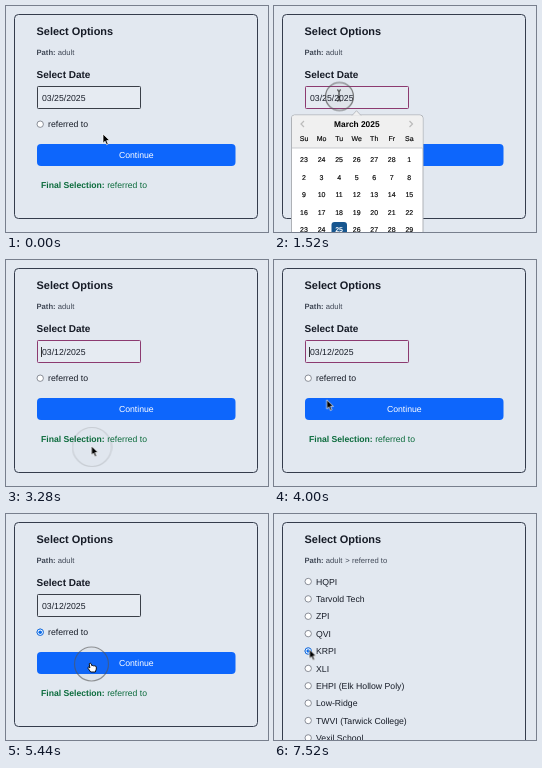
An HTML page for the animation above (8000 ms loop, 262 by 226 pixels).

```html
<!DOCTYPE html>
<html lang="en">
<head>
<meta charset="utf-8">
<title>Select options</title>
<style>
html, body { margin: 0; width: 100%; height: 100%; overflow: hidden; background: #e2e8f0; }
svg { display: block; width: 262px; height: 226px; }
text { font: 8.7px "Liberation Sans", Arial, sans-serif; fill: #161b26; text-rendering: geometricPrecision; white-space: pre; }
.b { font-weight: 700; }
.h1 { font-size: 10.95px; }
.h2 { font-size: 10px; }
.path { font-size: 7.65px; fill: #414957; }
.final { font-size: 8.65px; fill: #0b6b3c; }
.mid { text-anchor: middle; }
.month { font-size: 8.35px; fill: #000; }
.day { font-size: 7px; fill: #000; stroke: #000; stroke-width: .15; }
.white { fill: #fff; stroke: none; }
.frame { fill: none; stroke: #343c4c; }
.radio { fill: #fff; stroke: #707580; stroke-width: .8; }
.on { fill: #fff; stroke: #0b6be8; stroke-width: 1; }
.dot { fill: #0b6be8; }

/* One loop is 8 s, so 1% is 80 ms. */
.anim { animation: 8s step-end infinite; }
#first { animation-name: first; }
#second { animation-name: second; }
#input { animation-name: focus; }
#calendar { animation-name: calendar; }
#oldDate { animation-name: oldDate; }
#newDate { animation-name: newDate; }
#caret { animation-name: caret; }
#newCaret { animation-name: newCaret; }
#hover { animation-name: hover; }
#picked { animation-name: picked; }
#chosen { animation-name: chosen; }
#pointer { animation-name: move; animation-timing-function: ease-in-out; }
#ring { animation-name: ring; }
#arrow { animation-name: arrow; }
#beam { animation-name: beam; }
#hand { animation-name: hand; }

@keyframes first { 0% { opacity: 1 } 69%, 100% { opacity: 0 } }
@keyframes second { 0% { opacity: 0 } 69%, 100% { opacity: 1 } }
@keyframes focus { 0%, 55%, 100% { stroke: #3a3f48 } 19% { stroke: #8c3a70 } }
@keyframes calendar { 0%, 40%, 100% { opacity: 0 } 19% { opacity: 1 } }
@keyframes oldDate { 0% { opacity: 1 } 40%, 100% { opacity: 0 } }
@keyframes newDate { 0% { opacity: 0 } 40%, 100% { opacity: 1 } }
@keyframes caret { 0%, 40%, 100% { opacity: 0 } 24% { opacity: 1 } }
@keyframes newCaret { 0%, 55%, 100% { opacity: 0 } 40% { opacity: 1 } }
@keyframes hover {
  0%, 40%, 100% { opacity: 0; transform: none }
  30% { opacity: 1; transform: translateY(-17.4px) }
  31% { opacity: 1; transform: none }
}
@keyframes picked { 0% { opacity: 0 } 56%, 100% { opacity: 1 } }
@keyframes chosen { 0% { opacity: 0 } 92%, 100% { opacity: 1 } }
@keyframes arrow {
  0%, 28%, 40%, 50%, 79%, 100% { opacity: 1 }
  15%, 30%, 48%, 64% { opacity: 0 }
}
@keyframes beam { 0%, 28%, 100% { opacity: 0 } 15% { opacity: 1 } }
@keyframes hand {
  0%, 40%, 50%, 79%, 100% { opacity: 0 }
  30%, 48%, 64% { opacity: 1 }
}
@keyframes move {
  0%, .5% { transform: translate(97px, 128px) }
  7.5%, 9.9% { transform: translate(30px, 80px) }
  10%, 12.5% { transform: translate(29px, 80px) }
  13.5% { transform: translate(26px, 82px) }
  17.5%, 26.5% { transform: translate(65px, 89.5px) }
  31.5%, 33.5% { transform: translate(91px, 190px) }
  35%, 36.5% { transform: translate(89px, 188.5px) }
  39%, 43.5% { transform: translate(85.5px, 186px) }
  54.5%, 59.5% { transform: translate(35.5px, 115.5px) }
  66.5%, 77.5% { transform: translate(85px, 149px) }
  88.5%, 100% { transform: translate(35.5px, 135.5px) }
}
@keyframes ring {
  0%, 21%, 42%, 58%, 70%, 94%, 100% { r: 14px; opacity: 0 }
  19%, 39%, 55%, 67%, 91% { r: 14px; opacity: .8 }
  40%, 56%, 68%, 92% { r: 17px; opacity: .6 }
  20%, 41% { r: 19.5px; opacity: .18 }
  57%, 69%, 93% { r: 19.5px; opacity: .5 }
}
</style>
</head>
<body>
<svg viewBox="0 0 262 226">
  <rect width="262" height="226" fill="#e2e8f0"/>
  <text class="b h1" x="30.5" y="29">Select Options</text>
  <text class="path" x="30.5" y="49"><tspan class="b">Path:</tspan> adult</text>

  <g id="first" class="anim">
    <rect class="frame" x="8.5" y="8.5" width="243" height="204" rx="4"/>
    <text class="b h2" x="30.5" y="72">Select Date</text>
    <rect id="input" class="anim" x="31.5" y="80.5" width="103" height="22" rx=".8" fill="#e6ebf2"/>
    <text id="oldDate" class="anim" x="36" y="95">03/25/2025</text>
    <text id="newDate" class="anim" x="36" y="95">03/12/2025</text>
    <path id="caret" class="anim" d="M65.5 87v10" stroke="#000" stroke-width=".8"/>
    <path id="newCaret" class="anim" d="M35.5 87v10" stroke="#000" stroke-width=".8"/>
    <circle class="radio" cx="34.2" cy="118.2" r="3.2"/>
    <g id="picked" class="anim">
      <circle class="on" cx="34.2" cy="118.2" r="3.2"/>
      <circle class="dot" cx="34.2" cy="118.2" r="1.8"/>
    </g>
    <text x="42" y="121.3">referred to</text>
    <rect x="31" y="138" width="198.5" height="22" rx="4" fill="#0d66fc"/>
    <text class="mid white" x="130.3" y="152.2">Continue</text>
    <text class="final" x="35" y="182.3"><tspan class="b">Final Selection:</tspan> referred to</text>

    <g id="calendar" class="anim">
      <rect x="17.5" y="109" width="131.5" height="140" rx="3" fill="#fff" stroke="#aeb1b6"/>
      <path d="M18 142v-30q0-2.5 2.5-2.5h125.500q2.500 0 2.500 2.500v30z" fill="#f0f0f0"/>
      <path d="M18 142h130.500" stroke="#b4b6ba" stroke-width=".7"/>
      <path d="M78 109.500l4.500-4.800 4.500 4.800" fill="#f0f0f0" stroke="#aeb1b6" stroke-width=".8"/>
      <path d="M30 115l-3 3 3 3M135.500 115l3 3-3 3" fill="none" stroke="#bbb" stroke-width="1.200"/>
      <text class="b mid month" x="82.800" y="121.300">March 2025</text>
      <rect id="hover" class="anim" x="75" y="181.300" width="15.500" height="15.500" rx="3" fill="#e6e6e6"/>
      <rect x="57.500" y="216" width="15.500" height="15.500" rx="3" fill="#17568f"/>
      <g id="days"></g>
    </g>
  </g>

  <g id="second" class="anim">
    <rect class="frame" x="8.5" y="8.5" width="243" height="260" rx="4"/>
    <text class="path" x="71.300" y="49">&gt; referred to</text>
    <g id="schools"></g>
    <g id="chosen" class="anim">
      <circle class="on" cx="34.2" cy="137" r="3.2"/>
      <circle class="dot" cx="34.2" cy="137" r="1.8"/>
    </g>
  </g>

  <g id="pointer" class="anim">
    <circle id="ring" class="anim" cx=".5" cy="1" r="14" fill="#777" fill-opacity=".07" stroke="#555" stroke-width="1.200"/>
    <path id="arrow" class="anim" d="M0 0v9.200l2.100-2 1.500 3.500 1.600-.7-1.500-3.400h3z" fill="#000" stroke="#fff" stroke-width=".7"/>
    <path id="beam" class="anim" d="M-2-5.500q2 0 2 1.500v8q0 1.500-2 1.500M2-5.500q-2 0-2 1.500M0 4q0 1.500 2 1.500M-1.300 1.500h2.600" fill="none" stroke="#111" stroke-width=".9"/>
    <path id="hand" class="anim" d="M-1.800.8q.8-1.500 2 0l.7 2q.8-.7 1.500 0 .9-.5 1.500.3 1.200-.3 1.400 1v2l-1 2.900h-4.600l-2.700-3.700q-.3-1.200.6-1.200l1.300.8z" fill="#fff" stroke="#000" stroke-width=".9" stroke-linejoin="round"/>
  </g>
</svg>
<script>
const byId = id => document.getElementById(id);

function add(parent, tag, attrs, text = "") {
  const el = document.createElementNS("http://www.w3.org/2000/svg", tag);
  for (const key in attrs) el.setAttribute(key, attrs[key]);
  el.textContent = text;
  parent.append(el);
}

const columnX = i => 30 + 17.55 * i;

["Su", "Mo", "Tu", "We", "Th", "Fr", "Sa"].forEach((name, i) =>
  add(byId("days"), "text", { class: "day mid", x: columnX(i), y: 134.5 }, name));

// The grid starts on 23 February and runs through 29 March.
for (let i = 0; i < 35; i++) {
  const day = i < 6 ? 23 + i : i - 5;
  const selected = i === 30;
  add(byId("days"), "text", {
    class: "day mid" + (selected ? " b white" : ""),
    x: columnX(i % 7),
    y: 156.4 + 17.4 * Math.floor(i / 7)
  }, day);
}

const schools = [
  "HQPI", "Tarvold Tech", "ZPI", "QVI", "KRPI", "XLI",
  "EHPI (Elk Hollow Poly)", "Low-Ridge", "TWVI (Tarwick College)", "Vexil School"
];
schools.forEach((name, i) => {
  const y = 67.5 + 17.38 * i;
  add(byId("schools"), "circle", { class: "radio", cx: 34.2, cy: y, r: 3.2 });
  add(byId("schools"), "text", { x: 42, y: y + 3.2 }, name);
});
</script>
</body>
</html>
```
